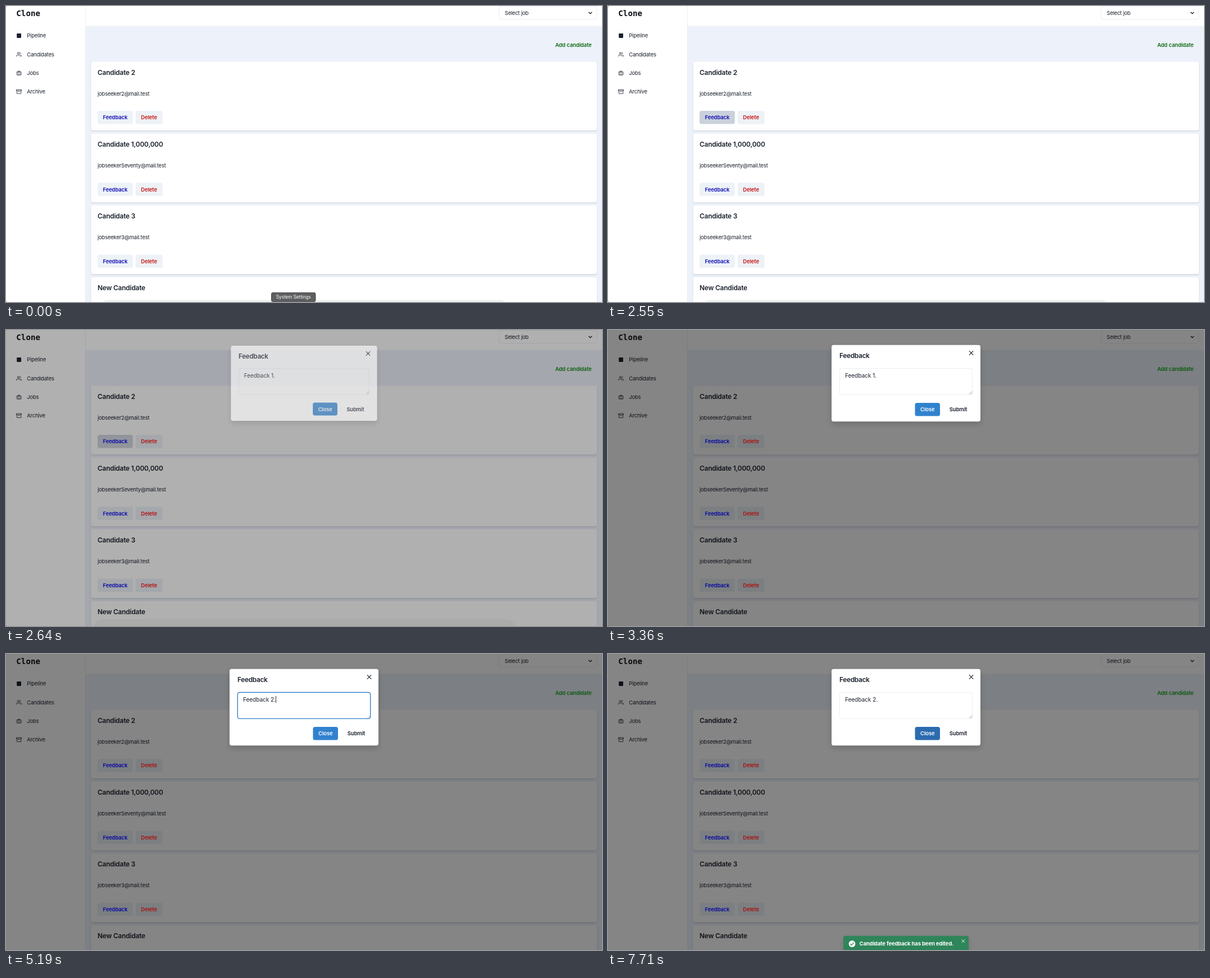
An HTML page with a canvas that plays this animation: 1061x528 px, repeating every 8000 ms.

```html
<!DOCTYPE html>
<html lang="en">
<head>
<meta charset="utf-8">
<title>Candidate feedback</title>
<style>
html, body { margin: 0; width: 100%; height: 100%; overflow: hidden; background: #fff; }
canvas { position: absolute; left: 0; top: 0; }
</style>
</head>
<body>
<script>
const W = 1061, H = 528, LOOP = 8000, STEP = 30;
const INK = [26, 32, 44], WHITE = [255, 255, 255];
const BG = [237, 242, 250], GRAY = [237, 242, 247], PRESSED = [203, 209, 219];
const BLUE = [49, 130, 206], BLUE_DARK = [43, 108, 176], LINE = [226, 232, 240];

function makeLayer() {
  const canvas = document.createElement('canvas');
  canvas.width = W;
  canvas.height = H;
  document.body.appendChild(canvas);
  return canvas.getContext('2d');
}
const page = makeLayer(), dialog = makeLayer(), toast = makeLayer();

// ---- timing ----
function bezier(x1, y1, x2, y2) {
  const at = (a, b, s) => 3 * a * s * (1 - s) ** 2 + 3 * b * s * s * (1 - s) + s ** 3;
  return x => {
    if (x <= 0) return 0;
    if (x >= 1) return 1;
    let lo = 0, hi = 1;
    for (let i = 0; i < 24; i++) {
      const mid = (lo + hi) / 2;
      if (at(x1, x2, mid) < x) lo = mid; else hi = mid;
    }
    return at(y1, y2, lo);
  };
}
const ease = bezier(.25, .1, .25, 1);
const easeOut = bezier(0, 0, .2, 1);
const easeInOut = bezier(.4, 0, .2, 1);
const ramp = (t, start, length, curve = ease) => curve((t - start) / length);
const mix = (a, b, k) => a.map((v, i) => v + (b[i] - v) * k);
const rgb = c => `rgb(${c.map(Math.round).join(',')})`;

// ---- drawing helpers ----
function box(c, x, y, w, h, r, fill, stroke, lineWidth = .7) {
  c.beginPath();
  c.roundRect(x, y, w, h, r);
  if (fill) { c.fillStyle = fill; c.fill(); }
  if (stroke) { c.strokeStyle = stroke; c.lineWidth = lineWidth; c.stroke(); }
}

function shadowed(c, dy, blur, alpha, draw) {
  c.save();
  c.shadowColor = `rgba(0,0,0,${alpha})`;
  c.shadowBlur = blur;
  c.shadowOffsetY = dy;
  draw();
  c.restore();
}

const STYLES = {
  body: ['400 9.47px', '-0.2px'],
  button: ['600 9.47px', '-0.12px'],
  heading: ['600 11.84px', '-0.17px'],
  title: ['600 11.84px', '-0.3px'],
  field: ['400 10.2px', '-0.1px'],
  tip: ['400 8.3px', '-0.1px'],
  notice: ['700 9.47px', '-0.12px'],
};

function text(c, str, x, y, style, color, align = 'left') {
  const [font, spacing] = STYLES[style];
  c.font = `${font} Inter, sans-serif`;
  c.letterSpacing = spacing;
  c.textAlign = align;
  c.fillStyle = color;
  c.fillText(str, x, y);
}

function lines(c, color, width, ...paths) {
  c.strokeStyle = color;
  c.lineWidth = width;
  c.lineCap = c.lineJoin = 'round';
  for (const pts of paths) {
    c.beginPath();
    pts.forEach(([x, y], i) => i ? c.lineTo(x, y) : c.moveTo(x, y));
    c.stroke();
  }
}

function cross(c, x, y, r, color, width) {
  lines(c, color, width, [[x - r, y - r], [x + r, y + r]], [[x + r, y - r], [x - r, y + r]]);
}

// ---- page ----
const NAV = [
  ['Pipeline', null],
  ['Candidates', 'M17 21v-2a4 4 0 0 0-4-4H5a4 4 0 0 0-4 4v2M23 21v-2a4 4 0 0 0-3-3.87M16 3.13a4 4 0 0 1 0 7.75M13 7a4 4 0 1 1-8 0a4 4 0 1 1 8 0'],
  ['Jobs', 'M4 7h16a2 2 0 0 1 2 2v10a2 2 0 0 1-2 2H4a2 2 0 0 1-2-2V9a2 2 0 0 1 2-2zM16 21V5a2 2 0 0 0-2-2h-4a2 2 0 0 0-2 2v16'],
  ['Archive', 'M21 8v13H3V8M1 3h22v5H1zM10 12h4'],
];
const CARDS = [
  ['Candidate 2', 'jobseeker2@mail.test'],
  ['Candidate 1,000,000', 'jobseekerSeventy@mail.test'],
  ['Candidate 3', 'jobseeker3@mail.test'],
  ['New Candidate', ''],
];
const CARD_STEP = 128.2;

function drawNav(c) {
  c.fillStyle = '#0d1117';
  c.font = 'bold 14.2px "DejaVu Sans Mono", monospace';
  c.letterSpacing = '0px';
  c.textAlign = 'left';
  c.fillText('Clone', 18.3, 17.6);
  NAV.forEach(([label, icon], i) => {
    const y = 53 + i * 33.25;
    text(c, label, 37.2, y + 3.4, 'body', rgb(INK));
    if (!icon) {
      box(c, 19.2, y - 3.9, 7.8, 7.8, .8, rgb(INK));
      return;
    }
    c.save();
    c.translate(18.3, y - 4.8);
    c.scale(.4, .4);
    c.strokeStyle = rgb(INK);
    c.lineWidth = 2;
    c.lineCap = c.lineJoin = 'round';
    c.stroke(new Path2D(icon));
    c.restore();
  });
}

function drawCards(c, press) {
  CARDS.forEach(([name, mail], i) => {
    const y = 99.2 + i * CARD_STEP;
    shadowed(c, .8, 2, .2, () => box(c, 151.3, y, 900.7, 123, 3.6, '#fff'));
    text(c, name, 163, y + 23.3, 'heading', rgb(INK));
    if (!mail) return;
    text(c, mail, 163, y + 60.4, 'body', rgb(INK));
    box(c, 163, y + 87.8, 62.8, 23.6, 3.6, rgb(i ? GRAY : mix(GRAY, PRESSED, press)));
    box(c, 230.6, y + 87.8, 48, 23.6, 3.6, rgb(GRAY));
  });
}

function drawDock(c, t) {
  const gone = ramp(t, 2640, 180);
  if (gone >= 1) return;
  if (t >= 2600) box(c, 156, 516 + gone * 12, 750, 40, 14, `rgba(0,0,0,${.03 * (1 - gone)})`);
  else box(c, 170, 524, 720, 30, 12, '#f1f1f1');
  const tip = 1 - ramp(t, 180, 240);
  if (tip <= 0) return;
  c.save();
  c.globalAlpha = tip;
  box(c, 472.5, 511.3, 78.5, 16, 2.5, '#5d5e60', '#3f4042', .9);
  text(c, 'System Settings', 511.8, 522.3, 'tip', '#fff', 'center');
  c.restore();
}

function drawAccents(c, dim) {
  const blue = rgb(mix([18, 14, 182], [8, 8, 160], dim));
  const red = rgb(mix([200, 20, 20], [168, 18, 18], dim));
  const green = rgb(mix([15, 106, 20], [10, 90, 16], dim));
  text(c, 'Add candidate', 1042.5, 73.3, 'button', green, 'right');
  for (let i = 0; i < 3; i++) {
    const y = 202.4 + i * CARD_STEP;
    text(c, 'Feedback', 194.4, y, 'button', blue, 'center');
    text(c, 'Delete', 254.6, y, 'button', red, 'center');
  }
}

function drawPage(t, open) {
  const c = page;
  c.fillStyle = '#fff';
  c.fillRect(0, 0, W, H);
  c.fillStyle = rgb(BG);
  c.fillRect(141.5, 35.6, W, H);
  c.fillStyle = rgb(LINE);
  c.fillRect(141, 0, .7, H);

  drawNav(c);
  box(c, 878, .4, 173.8, 23.4, 3.6, '#fff', rgb(LINE), .8);
  text(c, 'Select job', 887.8, 15.6, 'body', rgb(INK));
  lines(c, rgb(INK), 1.3, [[1037.6, 11.2], [1040.2, 13.8], [1042.8, 11.2]]);

  const press = .4 * ramp(t, 2180, 200) + .6 * ramp(t, 2440, 110) - ramp(t, 2610, 200);
  drawCards(c, press);
  drawDock(c, t);

  c.fillStyle = `rgba(0,0,0,${.48 * open})`;
  c.fillRect(0, 0, W, H);
  drawAccents(c, open);

  // rounded window corners on the left edge
  c.fillStyle = '#555';
  c.fillRect(0, 0, 1, 1);
  c.fillRect(0, H - 1, 1, 1);
}

// ---- dialog ----
function fieldText(t) {
  if (t < 4470) return 'Feedback 1.';
  if (t < 4560) return 'Feedback 1';
  if (t < 4920) return 'Feedback ';
  return t < 5190 ? 'Feedback 2' : 'Feedback 2.';
}

function drawDialog(t, open) {
  const c = dialog;
  c.canvas.style.opacity = open;
  c.clearRect(0, 0, W, H);
  if (open <= 0) return;
  c.save();
  const scale = .95 + .05 * open;
  c.translate(530.5, 95);
  c.scale(scale, scale);
  c.translate(-530.5, -95);

  shadowed(c, 5, 10, .16, () => box(c, 398, 26.8, 265, 136.4, 3.6, '#fff'));
  text(c, 'Feedback', 412, 49.7, 'title', rgb(INK));
  cross(c, 646.6, 41, 3.3, rgb(INK), 1.15);

  const focus = ramp(t, 4000, 200) - ramp(t, 6150, 200);
  box(c, 412.3, 68.5, 236.4, 46.9, 3.6, '#fff', rgb(mix(LINE, BLUE, focus)), .75 + .65 * focus);
  lines(c, '#777', .6, [[643.4, 114.4], [648, 109.8]], [[646, 114.4], [648, 112.4]]);

  const value = fieldText(t);
  text(c, value, 421.9, 84.8, 'field', rgb(INK));
  if (t >= 4020 && t < 5640) {
    c.fillStyle = '#000';
    c.fillRect(421.9 + c.measureText(value).width, 74.8, .8, 12);
  }

  const closeHover = ramp(t, 7500, 200);
  box(c, 546.5, 130, 44.5, 23.6, 3.6, rgb(mix(BLUE, BLUE_DARK, closeHover)));
  text(c, 'Close', 568.8, 145.4, 'button', '#fff', 'center');

  const submitHover = ramp(t, 6040, 200) - ramp(t, 7390, 200);
  box(c, 598, 130, 51, 23.6, 3.6, rgb(mix(WHITE, GRAY, submitHover)));
  text(c, 'Submit', 623.5, 145.4, 'button', rgb(INK), 'center');
  c.restore();
}

// ---- toast ----
function drawToast(t) {
  const c = toast, shown = ramp(t, 6370, 400, easeInOut);
  c.canvas.style.opacity = shown;
  c.clearRect(0, 0, W, H);
  if (shown <= 0) return;
  c.save();
  c.translate(0, 14.2 * (1 - shown));
  const green = '#2f855a';
  shadowed(c, 4, 8, .12, () => box(c, 419, 502.8, 223, 28.4, 3.6, green));
  c.fillStyle = '#fff';
  c.beginPath();
  c.arc(434.5, 517, 5.9, 0, Math.PI * 2);
  c.fill();
  lines(c, green, 1.3, [[431.8, 517.2], [433.8, 519.2], [437.4, 514.9]]);
  text(c, 'Candidate feedback has been edited.', 447.5, 520.4, 'notice', '#fff');
  cross(c, 632.4, 512, 2.6, '#fff', .95);
  c.restore();
}

function render(now) {
  const t = Math.floor((now % LOOP) / STEP) * STEP;
  const open = ramp(t, 2580, 200, easeOut);
  drawPage(t, open);
  drawDialog(t, open);
  drawToast(t);
}

let start = null;
function tick(now) {
  start ??= now;
  render(Math.max(0, now - start));
  requestAnimationFrame(tick);
}
render(0);
requestAnimationFrame(tick);
</script>
</body>
</html>
```
